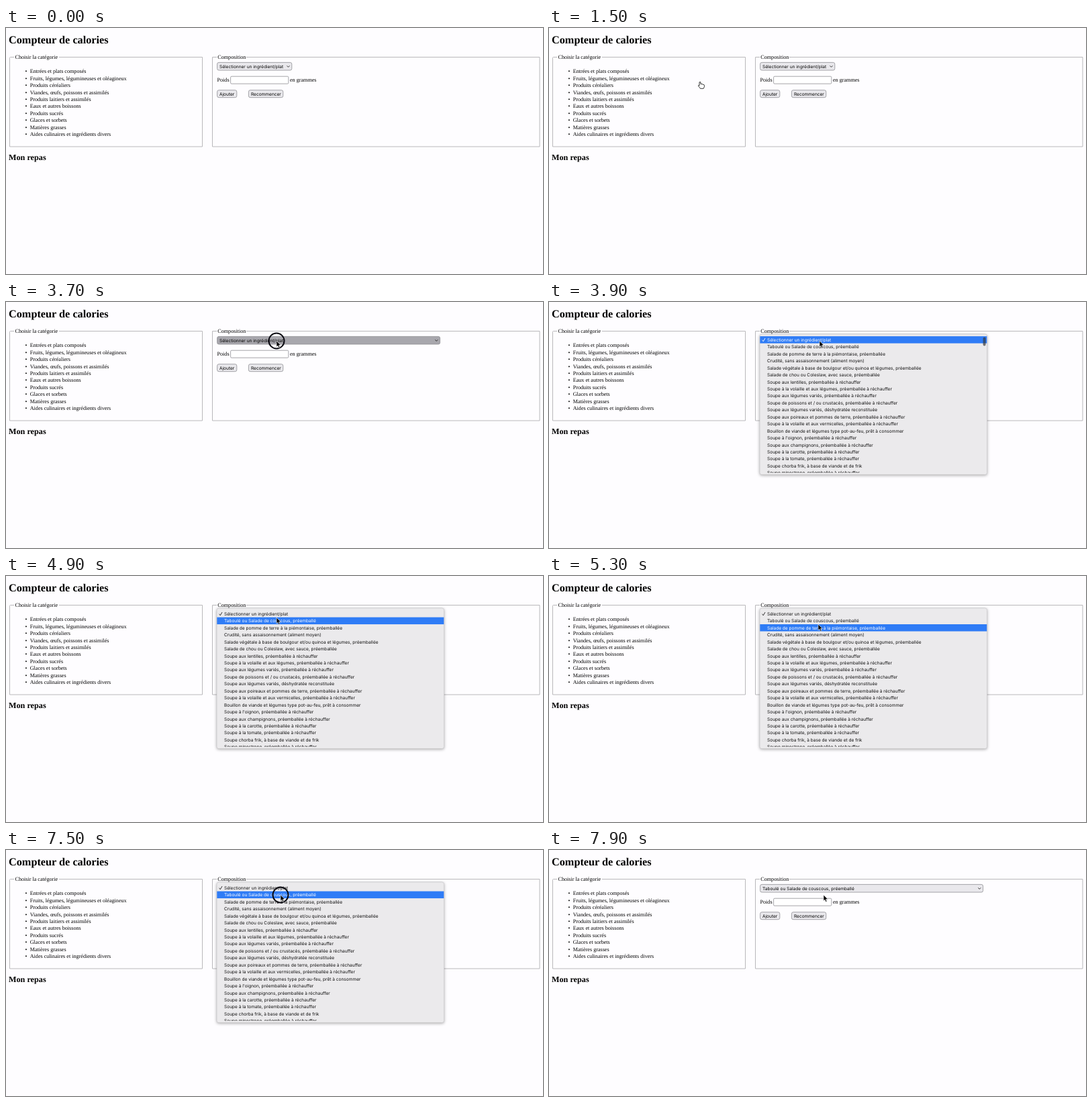
An HTML page that plays this animation: 800 px wide and 367 px high, repeating every 8000 ms.

```html
<!DOCTYPE html>
<html lang="fr">
<head>
<meta charset="utf-8">
<title>Compteur de calories</title>
<style>
html, body { margin: 0; height: 100%; overflow: hidden; background: #fefdff; }
svg { display: block; width: 800px; height: 367px; }
text { white-space: pre; text-rendering: geometricPrecision; }
.serif { font: 8.13px "Liberation Serif", Times, serif; }
.ui { font: 6.56px Inter, Arial, sans-serif; }
.title { font: bold 16.26px "Liberation Serif", Times, serif; }
.subtitle { font: bold 12.2px "Liberation Serif", Times, serif; }
.frame { fill: none; stroke: #b9b8bb; }
.control { fill: #e9e8ec; stroke: #8f8e93; stroke-width: .8; }
.field { fill: #fff; stroke: #8f8e93; stroke-width: .8; }
.line { fill: none; stroke: #222; stroke-width: .9; }
#menu { filter: drop-shadow(0 1.5px 2px #0005); }
#panel { fill: #ebeaec; stroke: #c4c3c6; stroke-width: .6; }
</style>
</head>
<body>
<svg viewBox="0 0 800 367">
  <clipPath id="clip"><rect x="314" y="48" width="339" height="207"/></clipPath>
  <g id="page">
    <path class="frame" d="M12 43.5H6.5Q5.5 43.5 5.5 44.5V177H292.5V43.5H79M314 43.5H307.5V177H795V43.5H358"/>
    <rect class="field" x="334.6" y="72.2" width="86.2" height="11" rx="1.5"/>
    <rect class="control" x="314.6" y="92.7" width="29.2" height="11" rx="2.5"/>
    <rect class="control" x="361.4" y="92.7" width="51.4" height="11" rx="2.5"/>
    <rect class="control" id="select" x="314.6" y="51.4" height="11.6" rx="2.5"/>
    <path class="line" id="chevron" d="M-2 -1L0 1L2 -1"/>
  </g>
  <g id="menu">
    <rect id="panel" x="314" y="48" width="338.6" height="209.6" rx="3"/>
    <rect id="bar" x="314.3" width="338" height="10.5" fill="#2f7cf6"/>
    <path class="line" id="check" d="M317.6 56.6L319.2 58.8L322 54"/>
    <g id="rows" clip-path="url(#clip)"></g>
    <rect id="thumb" x="646.6" y="52.5" width="4" height="13" rx="2" fill="#333a"/>
  </g>
  <circle id="ring" r="11.5" fill="none" stroke="#0b0b12" stroke-width="2"/>
  <path id="arrow" d="M0 0V9L2 7.2L3.4 10.4L5 9.7L3.6 6.6H6.4Z" fill="#000" stroke="#fff" stroke-width=".6"/>
  <path id="hand" d="M-1 5V1Q0 -.4 1 1V3.6Q2.2 2.9 2.9 3.9Q4.1 3.3 4.8 4.4Q6.3 4.2 6.4 5.6V7.4Q6 9 5.2 10.3H.4Q-.6 8.6 -2.6 6.3Q-2.6 4.8 -1 6Z" fill="#fff" stroke="#000" stroke-width=".8"/>
</svg>
<script>
const $ = id => document.getElementById(id);

function label(parent, cls, x, y, str) {
  const el = document.createElementNS("http://www.w3.org/2000/svg", "text");
  el.setAttribute("class", cls);
  el.setAttribute("x", x);
  el.setAttribute("y", y);
  el.textContent = str;
  return parent.appendChild(el);
}

const page = $("page");
label(page, "title", 4, 23.3, "Compteur de calories");
label(page, "subtitle", 4, 197, "Mon repas");
label(page, "serif", 13.5, 46, "Choisir la catégorie");
label(page, "serif", 315.3, 46, "Composition");
label(page, "serif", 314.5, 80.2, "Poids");
label(page, "serif", 423, 80.2, "en grammes");
label(page, "ui", 318, 100.5, "Ajouter");
label(page, "ui", 365, 100.5, "Recommencer");

[
  "Entrées et plats composés",
  "Fruits, légumes, légumineuses et oléagineux",
  "Produits céréaliers",
  "Viandes, œufs, poissons et assimilés",
  "Produits laitiers et assimilés",
  "Eaux et autres boissons",
  "Produits sucrés",
  "Glaces et sorbets",
  "Matières grasses",
  "Aides culinaires et ingrédients divers"
].forEach((str, i) => {
  const y = 67.4 + i * 10.39;
  label(page, "serif", 35.7, y, str);
  label(page, "serif", 28.4, y, "•");
});

const ROW = 10.45;
const dishes = [
  "Sélectionner un ingrédient/plat",
  "Taboulé ou Salade de couscous, préemballé",
  "Salade de pomme de terre à la piémontaise, préemballée",
  "Crudité, sans assaisonnement (aliment moyen)",
  "Salade végétale à base de boulgour et/ou quinoa et légumes, préemballée",
  "Salade de chou ou Coleslaw, avec sauce, préemballée",
  "Soupe aux lentilles, préemballée à réchauffer",
  "Soupe à la volaille et aux légumes, préemballée à réchauffer",
  "Soupe aux légumes variés, préemballée à réchauffer",
  "Soupe de poissons et / ou crustacés, préemballée à réchauffer",
  "Soupe aux légumes variés, déshydratée reconstituée",
  "Soupe aux poireaux et pommes de terre, préemballée à réchauffer",
  "Soupe à la volaille et aux vermicelles, préemballée à réchauffer",
  "Bouillon de viande et légumes type pot-au-feu, prêt à consommer",
  "Soupe à l'oignon, préemballée à réchauffer",
  "Soupe aux champignons, préemballée à réchauffer",
  "Soupe à la carotte, préemballée à réchauffer",
  "Soupe à la tomate, préemballée à réchauffer",
  "Soupe chorba frik, à base de viande et de frik",
  "Soupe minestrone, préemballée à réchauffer"
];
const rows = dishes.map((str, i) => label($("rows"), "ui", 325, 58.8 + i * ROW, str));
const chosen = label(page, "ui", 318, 59.5, "");

// pointer stops: time, x, y
const stops = [
  [500, 46, 170], [700, 329, 130], [900, 284, 92],
  [1300, 270, 90], [1500, 225, 80], [1700, 160, 66], [1900, 120, 60], [2100, 105, 58],
  [2500, 103, 60], [2700, 105, 62.5], [2900, 100, 57],
  [3100, 190, 84], [3300, 320, 82], [3500, 400, 62], [3700, 403, 58], [4500, 403, 59],
  [4900, 403, 62], [5100, 402, 67], [5300, 401, 72], [5500, 398, 75], [6100, 400, 75],
  [6500, 402, 74], [6700, 404, 72.5], [6900, 406, 70], [7100, 408, 68], [7300, 409, 67]
];

const show = (id, on) => $(id).style.display = on ? "" : "none";
const move = (id, x, y) => $(id).setAttribute("transform", `translate(${x} ${y})`);

function draw(t) {
  const during = (a, b) => t >= a && t < b;
  const [, x, y] = stops.filter(s => s[0] <= t).pop() || stops[0];
  const pointing = during(900, 3100);
  show("arrow", t >= 500 && !pointing);
  show("hand", pointing);
  show("ring", during(2900, 3100) || during(3700, 3900) || during(7500, 7700));
  for (const id of ["arrow", "hand", "ring"]) move(id, x, y);

  const wide = t >= 3100;
  $("select").setAttribute("width", wide ? 332 : 111.2);
  $("select").style.fill = during(3700, 3900) ? "#a8a7ad" : "";
  move("chevron", wide ? 641.3 : 420.5, 57.3);
  chosen.textContent = dishes[t >= 7900 ? 1 : 0];

  show("menu", during(3900, 7900));
  show("thumb", t < 4500);
  const active = Math.floor((y - 51) / ROW);
  $("bar").setAttribute("y", 51.1 + active * ROW);
  rows.forEach((row, i) => row.style.fill = i === active ? "#fff" : "#111");
  $("check").style.stroke = active ? "" : "#fff";
}

function tick() {
  draw(performance.now() % 8000);
  requestAnimationFrame(tick);
}
tick();
</script>
</body>
</html>
```
